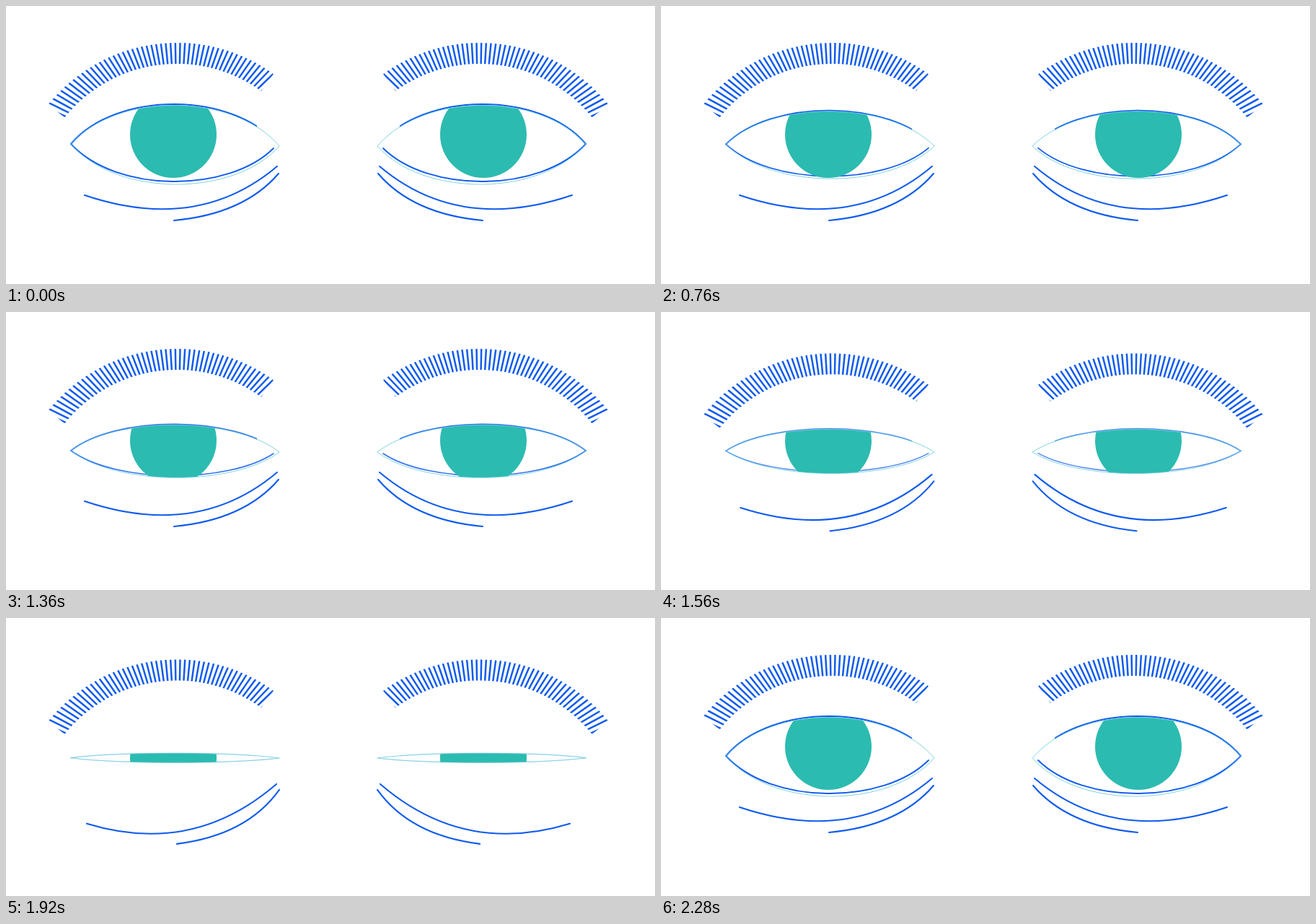
Animation of 900x385 px, one loop 3.96 s. Source, as an HTML page with a canvas:

```html
<!DOCTYPE html>
<html lang="en">
<head>
<meta charset="utf-8">
<title>Tired eyes</title>
<style>
  html, body { margin: 0; width: 100%; height: 100%; overflow: hidden; background: #fff; }
  canvas { display: block; }
</style>
</head>
<body>
<canvas id="stage" width="900" height="385"></canvas>
<script>
const ctx = document.getElementById('stage').getContext('2d');
const LOOP = 3960, STEP = 40, MIRROR = 894;
const BLUE = '#105bee', TEAL = '#2cbbb0', CYAN = '#62c9d8';
const RAD = Math.PI / 180;

const progress = (t, from, to) => Math.min(1, Math.max(0, (t - from) / (to - from)));
const sine = p => (1 - Math.cos(Math.PI * p)) / 2;
const ease = (t, from, to) => sine(progress(t, from, to));

// How far the lids are open: slow droop, quick close, reopening.
function openness(t) {
  if (t >= 1816) return ease(t, 1816, 2280);
  const drooped = 1 - 0.382 * progress(t, 280, 1520);
  return drooped * (1 - ease(t, 1520, 1720));
}

function bagDrop(t) {
  const rest = 1 - progress(t, 1860, 2280);
  return 1.35 * ease(t, 1400, 1840) * rest * rest;
}

const browDrop = t => 6.5 * (ease(t, 1400, 1580) - ease(t, 1920, 2280));
const irisDrop = t => 16 * (ease(t, 1540, 1740) - ease(t, 1880, 2280));

function stroke(path, color, width) {
  ctx.strokeStyle = color;
  ctx.lineWidth = width;
  ctx.stroke(path);
}

function clipped(region, draw) {
  ctx.save();
  ctx.clip(region);
  draw();
  ctx.restore();
}

// Ticks fan out from a point above the centre of the band that trims them.
function drawBrow(drop) {
  const cx = 237, cy = 280 + drop, fanX = 238, fanY = 222 + drop;
  const start = -141.1 * RAD, end = -54.2 * RAD;
  const band = new Path2D();
  band.arc(cx, cy, 229, start, end);
  band.arc(cx, cy, 200, end, start, true);
  band.closePath();

  const ticks = new Path2D();
  for (let i = -29; i <= 22; i++) {
    const angle = (i * 2.24 - 1.07) * RAD;
    const dx = Math.sin(angle), dy = -Math.cos(angle);
    ticks.moveTo(fanX + dx * 100, fanY + dy * 100);
    ticks.lineTo(fanX + dx * 230, fanY + dy * 230);
  }
  clipped(band, () => stroke(ticks, BLUE, 2.5));
}

// A lid line between two corners whose middle reaches the height peak.
function lid(path, x1, y1, x2, y2, peak) {
  const control = (4 * peak - (y1 + y2) / 2) / 3;
  const inset = 63 * Math.sign(x2 - x1);
  path.bezierCurveTo(x1 + inset, control, x2 - inset, control, x2, y2);
}

function drawLidLines(open, leftY) {
  const upper = new Path2D(), lower = new Path2D(), lashSide = new Path2D();
  upper.moveTo(90, leftY);
  lid(upper, 90, leftY, 379, 194, 194 - 58 * open);
  lower.moveTo(90, leftY);
  lid(lower, 90, leftY, 371, 194 + 3 * open, 194 + 49 * open);
  lashSide.rect(0, 0, 348, 385);

  ctx.globalAlpha = Math.min(1, 1.3 * open);
  clipped(lashSide, () => stroke(upper, BLUE, 1 + open));
  stroke(lower, BLUE, 0.9 + open);
  ctx.globalAlpha = 1;
}

function drawEye(open, drop) {
  const leftY = 194 - 3 * open;
  drawLidLines(open, leftY);

  const shape = new Path2D();
  shape.moveTo(90, leftY);
  lid(shape, 90, leftY, 379, 194, 194 - 56.5 * open);
  lid(shape, 379, 194, 90, leftY, 194 + 53 * open);
  shape.closePath();

  const iris = new Path2D();
  iris.arc(232, 178 + drop, 60, 0, 2 * Math.PI);
  clipped(shape, () => { ctx.fillStyle = TEAL; ctx.fill(iris); });
  stroke(shape, CYAN, 0.8);
}

function drawBags(b) {
  const bags = new Path2D();
  bags.moveTo(109 + 3 * b, 262 + 23 * b);
  bags.quadraticCurveTo(266 - 7 * b, 315 + 15 * b, 376 - b, 222 + 8 * b);
  bags.moveTo(233 + 4 * b, 297 + 16 * b);
  bags.quadraticCurveTo(330 + 4 * b, 288 + 13 * b, 378 + b, 232 + 6 * b);
  stroke(bags, BLUE, 2.1);
}

function draw(t) {
  ctx.setTransform(1, 0, 0, 1, 0, 0);
  ctx.fillStyle = '#fff';
  ctx.fillRect(0, 0, 900, 385);
  ctx.lineCap = 'round';
  for (const side of [1, -1]) {
    ctx.setTransform(side, 0, 0, 1, side < 0 ? MIRROR : 0, 0);
    drawBrow(browDrop(t));
    drawEye(openness(t), irisDrop(t));
    drawBags(bagDrop(t));
  }
}

const began = performance.now();
function frame() {
  const t = (performance.now() - began) % LOOP;
  draw(Math.floor(t / STEP) * STEP);
  requestAnimationFrame(frame);
}
frame();
</script>
</body>
</html>
```
